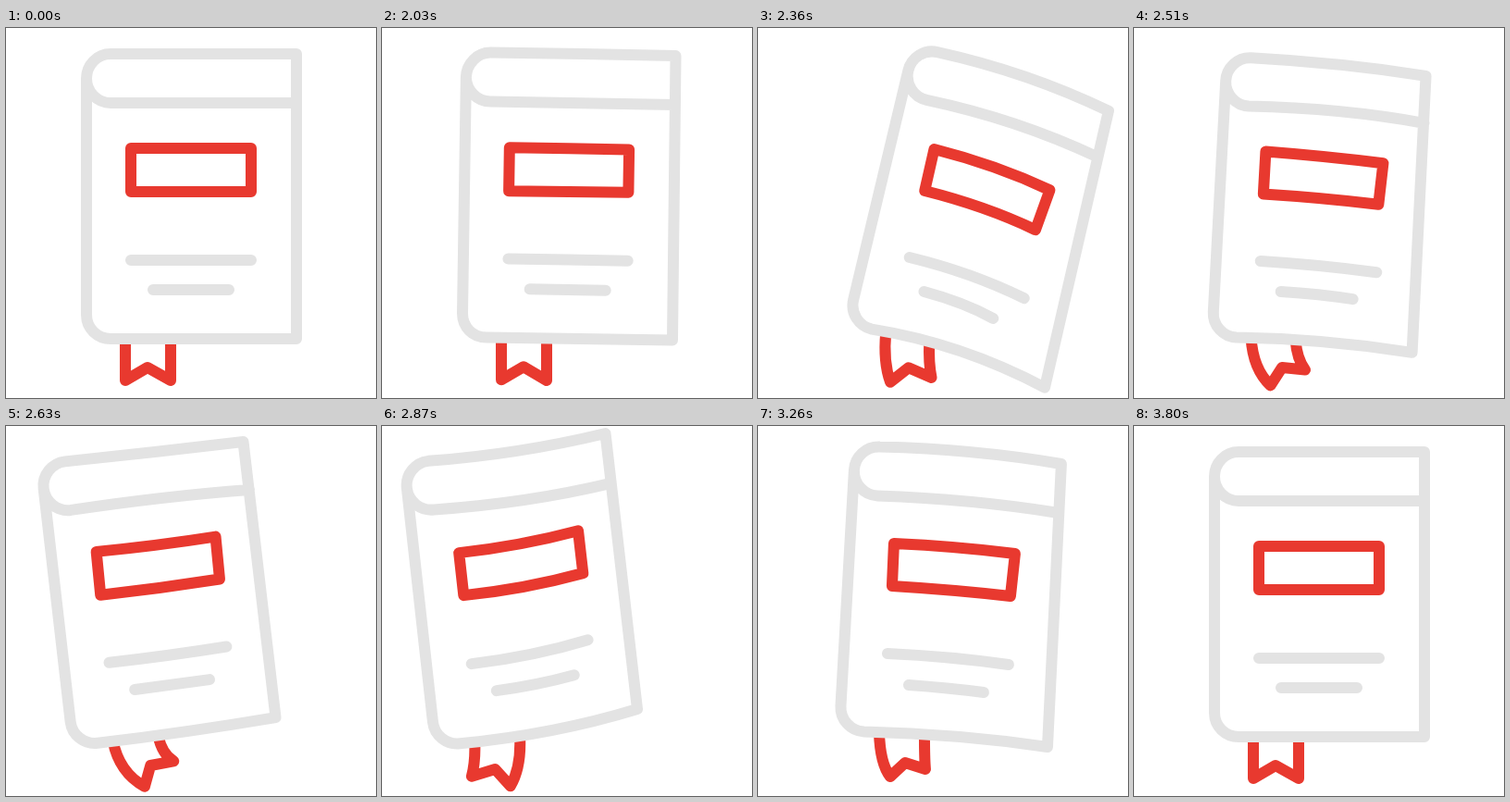
An HTML page without scripts for the animation above (3.83 s loop, 400 by 400 pixels).

```html
<!DOCTYPE html>
<html lang="en">
<head>
<meta charset="utf-8">
<title>Swinging book</title>
<style>
html, body { margin: 0; width: 100%; height: 100%; overflow: hidden; background: #fff; }
svg { display: block; width: 100%; height: 100%; }
path { fill: none; stroke-width: 12; stroke-linejoin: round; stroke-linecap: round; animation: 3830ms linear infinite; }
.red { stroke: #e8392f; }
.grey { stroke: #e3e3e3; }
.ribbon { stroke-linecap: butt; animation-name: ribbon; }
.book { animation-name: book; }
.label { animation-name: label; }

/* band, spine and cover outline, then the two text lines */
@keyframes book {
  0%, 52.48% {
    d: path("M314 81Q213 81 113 81C98.5 81 87 69 87 54.5C87 40 98.5 28 113 28Q213 28 314 28L314 336Q213 336 113 336C99 336 87 325 87 310L87 54.5M135 251Q200 251 265 251M159 283Q200 283 241 283");
  }
  53.26% {
    d: path("M317 84Q218 81 119 79C104.5 79 93 67 92.5 53C93 38 105 26 119 26Q218 27.5 319 31L314 338Q213 335.5 113 334C98 334 87 323 87 308L92.5 53M137 249Q202 250 266 252M160 282Q201 283 242 284");
    animation-timing-function: cubic-bezier(.4,.3,.6,1);
  }
  60.05% {
    d: path("M372 145Q287 101 188.6 77.7C174.4 74.2 165.8 59.8 169.3 45.6C172.8 31.4 186.8 22.5 201 26Q299 50 385 95L310 391Q220 341 124 324.7C110 321.2 101.3 306.8 104.8 292.6L169.3 45.6M166 248Q234 265 290 296M181 285Q224 298 255 317");
    animation-timing-function: cubic-bezier(.33,0,.67,.33);
  }
  61.88% {
    d: path("M366 138Q279 98 180.3 77.9C166 74.7 157 60.5 160.1 46.3C163.3 32 177.4 23 191.7 26.1Q290 47 377 88L310 388Q220 341 122.8 325.9C108.5 322.7 99.4 308.6 102.6 294.3L160.1 46.3M163 248Q230 264 287 291M179 285Q222 296 254 313");
    animation-timing-function: cubic-bezier(.33,.19,.67,.73);
  }
  68.93% {
    d: path("M260 67Q170 75 66.9 91.3C52.4 93.2 39.1 82.9 37.2 68.4C35.3 53.9 45.6 40.6 60.1 38.7Q157 28 253 15L291 313Q195 331 98.4 343.3C83.9 345.2 70.6 334.9 68.7 320.4L37.2 68.4M110 256Q175 248 237 237M138 285Q179 279 219 273");
    animation-timing-function: cubic-bezier(.33,.63,.67,1);
  }
  71.8% {
    d: path("M239 61Q147 81 48.4 91.2C34 93.4 20.5 83.4 18.3 68.9C16.1 54.4 26.1 41 40.6 38.8Q138 28 232 8L276 306Q186 331 86.9 343.2C72.4 345.4 59 335.4 56.8 320.9L18.3 68.9M95 258Q160 249 220 233M123 287Q166 281 206 271");
    animation-timing-function: cubic-bezier(.33,0,.67,.33);
  }
  75.2% {
    d: path("M249 62Q158 84 57.4 90.3C42.9 91.9 29.8 81.4 28.2 66.9C26.6 52.4 37.1 39.3 51.6 37.7Q150 31 243 8L276 306Q186 334 84 343.3C69.4 344.9 56.3 334.5 54.7 320L28.2 66.9M97 257Q165 249 223 231M124 286Q169 280 208 269");
    animation-timing-function: cubic-bezier(.33,.32,.67,1);
  }
  85.38% {
    d: path("M325 94Q232 79 129.2 75.5C114.6 74.8 103.3 62.3 104 47.7C104.7 33.1 117.2 21.8 131.8 22.5Q235 25 328 41L313 347Q218 333 114.7 330.5C100.1 329.8 88.8 317.3 89.5 302.7L104 47.7M140 246Q207 249 271 258M163 280Q205 283 244 288");
    animation-timing-function: cubic-bezier(.37,0,.63,1);
  }
  94.8%, 100% {
    d: path("M314 81Q213 81 113 81C98.5 81 87 69 87 54.5C87 40 98.5 28 113 28Q213 28 314 28L314 336Q213 336 113 336C99 336 87 325 87 310L87 54.5M135 251Q200 251 265 251M159 283Q200 283 241 283");
  }
}

@keyframes label {
  0%, 52.48% { d: path("M135 130Q200 130 265 130L265 177Q200 177 135 177Z"); }
  53.26% { d: path("M139 129Q204 130 268 132L267 178Q203 177 138 176Z"); animation-timing-function: cubic-bezier(.4,.3,.6,1); }
  60.05% { d: path("M195 131Q263 148 320 179L303 222Q250 194 184 176Z"); animation-timing-function: cubic-bezier(.33,0,.67,.33); }
  61.88% { d: path("M189 131Q256 148 314 174L299 217Q245 192 179 176Z"); animation-timing-function: cubic-bezier(.33,.19,.67,.73); }
  68.93% { d: path("M95 136Q160 129 224 118L229 164Q165 175 100 183Z"); animation-timing-function: cubic-bezier(.33,.63,.67,1); }
  71.8% { d: path("M78 138Q143 130 206 115L213 160Q150 177 84 184Z"); animation-timing-function: cubic-bezier(.33,0,.67,.33); }
  75.2% { d: path("M84 137Q150 130 213 113L218 159Q156 176 89 183Z"); animation-timing-function: cubic-bezier(.33,.32,.67,1); }
  85.38% { d: path("M147 127Q214 130 278 138L273 184Q211 177 145 173Z"); animation-timing-function: cubic-bezier(.37,0,.63,1); }
  94.8%, 100% { d: path("M135 130Q200 130 265 130L265 177Q200 177 135 177Z"); }
}

/* the ribbon trails behind the cover and settles last */
@keyframes ribbon {
  0%, 52.48% { d: path("M129 336Q129 358 129 381L153 367L178 381Q178 358 178 336"); }
  53.26% { d: path("M129 335Q129 358 129 380L153 366L178 381Q178 358 178 336"); animation-timing-function: cubic-bezier(.4,.3,.6,1); }
  60.05% { d: path("M139 329Q136 358 137 382L159 368L183 381Q185 362 186 340"); animation-timing-function: cubic-bezier(.33,0,.67,.33); }
  61.88% { d: path("M138 329Q135 362 145 383L164 367L189 377Q184 362 185 339"); animation-timing-function: cubic-bezier(.33,.19,.67,.73); }
  68.93% { d: path("M115 341Q122 375 150 390L156 367L181 362Q168 354 164 335"); }
  71.8% { d: path("M103 341Q104 368 122 389L139 371L163 380Q156 366 151 336"); }
  75.2% { d: path("M100 341Q101 362 95 378L121 371L137 390Q150 370 149 337"); animation-timing-function: cubic-bezier(.33,.32,.67,1); }
  85.38% { d: path("M131 331Q132 365 143 379L159 364L181 371Q180 360 180 333"); animation-timing-function: cubic-bezier(.37,0,.63,1); }
  94.8% { d: path("M129 336Q129 360 127 382L152 368L176 383Q178 360 178 336"); animation-timing-function: ease-in-out; }
  98.7%, 100% { d: path("M129 336Q129 358 129 381L153 367L178 381Q178 358 178 336"); }
}
</style>
</head>
<body>
<svg viewBox="0 0 400 400">
  <path class="red ribbon" d="M129 336Q129 358 129 381L153 367L178 381Q178 358 178 336"/>
  <path class="grey book" d="M314 81Q213 81 113 81C98.5 81 87 69 87 54.5C87 40 98.5 28 113 28Q213 28 314 28L314 336Q213 336 113 336C99 336 87 325 87 310L87 54.5M135 251Q200 251 265 251M159 283Q200 283 241 283"/>
  <path class="red label" d="M135 130Q200 130 265 130L265 177Q200 177 135 177Z"/>
</svg>
</body>
</html>
```
